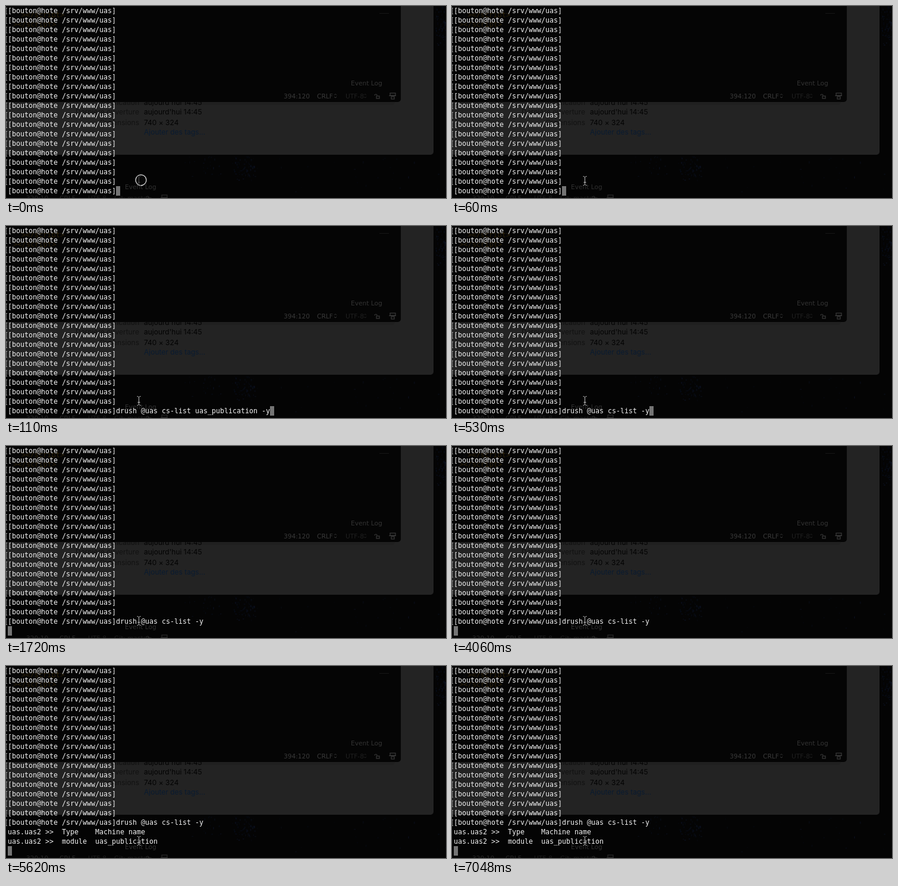
An HTML page with a canvas that plays this animation: 740x324 px, repeating every 8000 ms.

```html
<!DOCTYPE html>
<html lang="fr">
<head>
<meta charset="utf-8">
<title>Terminal</title>
<style>
  html, body { margin: 0; width: 100%; height: 100%; overflow: hidden; background: #040404; }
  canvas { display: block; }
</style>
</head>
<body>
<canvas id="stage" width="740" height="324"></canvas>
<script>
const W = 740, H = 324, LOOP = 8000;
const CELL = 7, ROW = 16, LEFT = 3, LAST = 19;
const MONO = '11.63px "DejaVu Sans Mono", monospace';
const STATUS = '10.6px "DejaVu Sans", sans-serif';
const INFO = '12px Inter, sans-serif';
const PROMPT = '[bouton@hote /srv/www/uas]';
const COMMAND = 'drush @uas cs-list -y';
const OUTPUT = [
  'uas.uas2 >>  Type    Machine name',
  'uas.uas2 >>  module  uas_publication'
];

// Terminal contents from each moment on: [start, typed text, output lines, entered]
const STEPS = [
  [0, '', 0, false],
  [110, 'drush @uas cs-list uas_publication -y', 0, false],
  [530, COMMAND, 0, false],
  [1720, COMMAND, 0, true],
  [5620, COMMAND, 2, true]
];
const CLICK_END = 60;

const ctx = document.getElementById('stage').getContext('2d');
const backdrop = document.createElement('canvas');
backdrop.width = W;
backdrop.height = H;

function write(c, text, x, y, font, color, align = 'left') {
  c.font = font;
  c.fillStyle = color;
  c.textAlign = align;
  c.fillText(text, x, y);
}

function panel(c, x, y, w, h, color) {
  c.fillStyle = color;
  c.beginPath();
  c.roundRect(x, y, w, h, 5);
  c.fill();
}

function line(c, points, color, width) {
  c.strokeStyle = color;
  c.lineWidth = width;
  c.beginPath();
  points.forEach(([x, y], i) => i ? c.lineTo(x, y) : c.moveTo(x, y));
  c.stroke();
}

function specks(c, x, y, w, h, count) {
  let seed = 17;
  const rnd = () => (seed = (seed * 16807) % 2147483647) / 2147483647;
  for (let i = 0; i < count; i++) {
    c.fillStyle = `rgba(20, 34, 66, ${0.1 + rnd() * 0.22})`;
    c.fillRect(x + rnd() * w, y + rnd() * h, 1 + rnd() * 2, 1 + rnd() * 3);
  }
}

function statusIcons(c, x, y, color) {
  c.strokeStyle = color;
  c.lineWidth = 1.2;
  c.strokeRect(x + 3, y, 5, 4);
  c.beginPath();
  c.arc(x + 2, y - 1, 2, Math.PI, 0);
  c.stroke();
  c.strokeRect(x + 26, y - 5, 9, 4);
  c.strokeRect(x + 28, y + 1, 5, 4);
  line(c, [[x + 24, y - 0.5], [x + 36, y - 0.5]], color, 1);
}

function chevrons(c, x, y, color) {
  line(c, [[x, y - 1.5], [x + 2, y - 3.5], [x + 4, y - 1.5]], color, 1);
  line(c, [[x, y + 1], [x + 2, y + 3], [x + 4, y + 1]], color, 1);
}

function paintBackdrop(c) {
  c.fillStyle = '#040404';
  c.fillRect(0, 0, W, H);
  specks(c, 721, 0, 18, 65, 70);
  specks(c, 380, 253, 38, 40, 70);
  specks(c, 300, 253, 60, 35, 25);
  specks(c, 420, 255, 320, 60, 25);

  // Information panel behind the editor
  panel(c, -10, -10, 729, 261, '#232323');
  panel(c, -10, -10, 664, 177, '#202020');
  const rows = [
    ['Modification', "aujourd'hui 14:45"],
    ['Dernière ouverture', "aujourd'hui 14:45"],
    ['Dimensions', '740 × 324']
  ];
  rows.forEach(([label, value], i) => {
    const y = 167 + i * 17 - (i === 1 ? 1 : 0);
    write(c, label, 224, y, INFO, '#121212', 'right');
    write(c, value, 232, y, INFO, '#030303');
  });
  write(c, 'Ajouter des tags…', 232, 217, INFO, '#0a1b30');

  // Editor window
  panel(c, -10, -10, 674, 172, '#050505');
  const code = '12px "DejaVu Sans Mono", monospace';
  write(c, '><\/script>', 26, 19, code, '#2b2008');
  write(c, '><\/script>', 12, 35, code, '#2b2008');
  line(c, [[628, 12.5], [644, 12.5]], '#161616', 1);
  write(c, 'Event Log', 580, 134, STATUS, '#343434');
  write(c, '394:120', 467, 156, STATUS, '#3a3a3a');
  write(c, 'CRLF', 523, 156, STATUS, '#3a3a3a');
  chevrons(c, 552, 152, '#3a3a3a');
  write(c, 'UTF-8', 571, 156, STATUS, '#202020');
  chevrons(c, 602, 152, '#202020');
  statusIcons(c, 620, 152, '#3a3a3a');

  // Second editor, cut by the lower edge
  write(c, 'Event Log', 200, 309, STATUS, '#303030');
  write(c, '320:10', 34, 328, STATUS, '#282828');
  write(c, 'CRLF', 90, 328, STATUS, '#282828');
  write(c, 'UTF-8', 138, 328, STATUS, '#1c1c1c');
  write(c, 'Git: master', 182, 328, STATUS, '#1c1c1c');
  statusIcons(c, 236, 324, '#282828');
}

function termLine(row, text) {
  write(ctx, text, LEFT, row * ROW + 12, MONO, '#f2f2f2');
}

function promptLine(row, typed, marked) {
  if (marked) write(ctx, '[', LEFT - CELL + 1, row * ROW + 12, MONO, '#a0a0a0');
  termLine(row, PROMPT + typed);
}

function block(column) {
  ctx.fillStyle = '#747474';
  ctx.fillRect(LEFT + column * CELL, LAST * ROW, CELL, ROW);
}

function beam(color, width) {
  const x = 223.5;
  line(ctx, [[x - 3, 287.5], [x - 1.5, 287.5], [x, 289], [x, 301], [x - 1.5, 302.5], [x - 3, 302.5]], color, width);
  line(ctx, [[x + 3, 287.5], [x + 1.5, 287.5], [x, 289]], color, width);
  line(ctx, [[x, 301], [x + 1.5, 302.5], [x + 3, 302.5]], color, width);
  line(ctx, [[x - 2, 297.5], [x + 2, 297.5]], color, width);
}

function pointer(clicked) {
  if (clicked) {
    ctx.fillStyle = '#080808';
    ctx.strokeStyle = '#f0f0f0';
    ctx.lineWidth = 1.2;
    ctx.beginPath();
    ctx.arc(227, 293.8, 9, 0, Math.PI * 2);
    ctx.fill();
    ctx.stroke();
    beam('#4c4c4c', 1);
  } else {
    beam('#000', 2.6);
    beam('#c4c4c4', 1);
  }
}

function draw(t) {
  const [, typed, shown, entered] = STEPS.filter(s => s[0] <= t).pop();
  const current = entered ? LAST - 1 - shown : LAST;
  ctx.drawImage(backdrop, 0, 0);
  for (let row = 0; row < current; row++) promptLine(row, '', true);
  block(entered ? 0 : PROMPT.length + typed.length);
  promptLine(current, typed, entered);
  for (let i = 0; i < shown; i++) termLine(current + 1 + i, OUTPUT[i]);
  pointer(t < CLICK_END);
}

paintBackdrop(backdrop.getContext('2d'));
const start = performance.now();
function tick() {
  draw(Math.max(0, performance.now() - start) % LOOP);
  requestAnimationFrame(tick);
}
tick();
</script>
</body>
</html>
```
